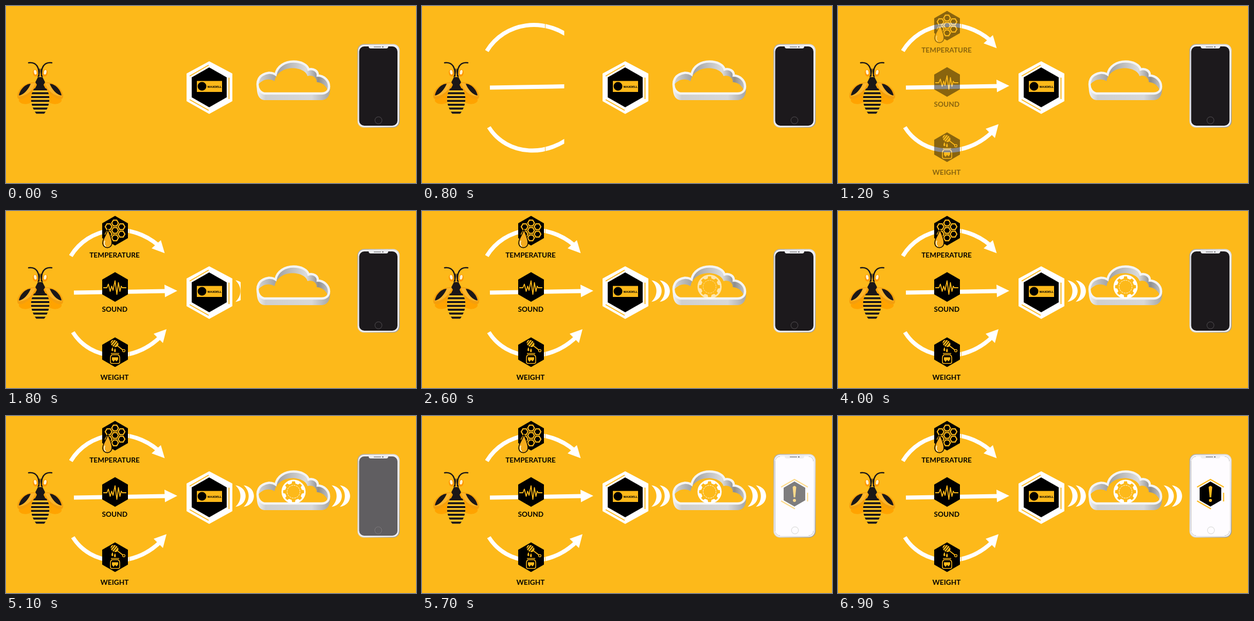
Write an HTML page that moves like this. It is 797x346 px and loops after 8 s.

```html
<!DOCTYPE html>
<html lang="en">
<head>
<meta charset="utf-8">
<title>Hive monitoring</title>
<style>
  html, body { margin: 0; width: 100%; height: 100%; overflow: hidden; background: #fdb91a; }
  svg { display: block; width: 100%; height: 100%; }
  .label { font: bold 13.7px Lato, sans-serif; text-anchor: middle; }
  .brand { font: bold 6.2px Roboto, sans-serif; }
  .line { fill: none; stroke: #fdb91a; }
  .ink { fill: none; stroke: #1b1718; stroke-linecap: round; }
</style>
</head>
<body>
<svg viewBox="0 0 797 346">
  <defs>
    <linearGradient id="wall">
      <stop offset="0" stop-color="#d5d5d5"/><stop offset=".27" stop-color="#a0a0a0"/>
      <stop offset=".68" stop-color="#dcdcdc"/><stop offset=".85" stop-color="#8d8d8d"/>
      <stop offset="1" stop-color="#c5c5c5"/>
    </linearGradient>
    <linearGradient id="side">
      <stop offset="0" stop-color="#f4f4f4"/><stop offset=".12" stop-color="#cfcfcf"/>
      <stop offset=".75" stop-color="#d8d8d8"/><stop offset="1" stop-color="#a5a5a5"/>
    </linearGradient>
    <linearGradient id="steel" x2="1" y2="1">
      <stop offset="0" stop-color="#a9a9ac"/><stop offset=".5" stop-color="#dcdcdf"/>
      <stop offset="1" stop-color="#9a9a9d"/>
    </linearGradient>
    <path id="cloud" d="M502 171C485 167 485 141 500 134C508 129 518 130 524 134C527 117 543 108.500 559 108.500C574 108.500 586 115 588 124C597 121 607 127 606 136C618 136 628 146 628 157C628 166 622 171 613 171Z"/>
    <clipPath id="cloudClip"><use href="#cloud"/></clipPath>
    <path id="abdomen" d="M55 161H78C86 172 88 192 74 211H59C45 192 47 172 55 161Z"/>
    <clipPath id="abdomenClip"><use href="#abdomen"/></clipPath>
    <clipPath id="arrowWipe"><rect id="arrowRect" x="123" y="9" height="321"/></clipPath>
    <clipPath id="waveWipe"><rect id="waveRect" x="445" y="130" height="54"/></clipPath>
    <clipPath id="wave2Wipe"><rect id="wave2Rect" x="632" y="130" height="54"/></clipPath>
    <path id="crescent" d="M446 135.500C472.500 139 472.500 174 446 177.500C459 166 459 147 446 135.500Z"/>
    <g id="waves" fill="#fff"><use href="#crescent"/><use href="#crescent" x="16"/></g>
    <g id="beeHalf">
      <path d="M60 153C42 160 24 176 25 186C31 195 50 193 55 182Z" fill="#ffa300"/>
      <path d="M59 150C44 146 23 159 22 176C22 186 33 183 42 176C50 169 56 160 59 150Z" fill="#f59f0c"/>
      <path d="M57 151C46 149 28 160 24 176C36 178 52 167 57 151Z" fill="#fdb42a"/>
      <path d="M48 152C38 152 27 163 25 175C34 174 44 163 48 152Z" fill="#1b1718"/>
      <path class="ink" stroke-width="2.600" d="M64 137C65 121 60 109 44 111"/>
      <path class="ink" stroke-width="1.500" d="M62 138C65 133 66 128 65 123"/>
      <ellipse cx="57" cy="131" rx="4.800" ry="7" fill="#ff9700" transform="rotate(-12 57 131)"/>
      <ellipse cx="57" cy="129.500" rx="2.600" ry="4.500" fill="#fff3d2" transform="rotate(-12 57 130)"/>
    </g>
  </defs>

  <rect width="797" height="346" fill="#fdb91a"/>

  <g id="bee">
    <use href="#beeHalf"/><use href="#beeHalf" transform="matrix(-1 0 0 1 133 0)"/>
    <path d="M62 139H71L76 149L73 154L77 162H56L60 154L57 149Z" fill="#1b1718"/>
    <use href="#abdomen" fill="#ffc52b"/>
    <path clip-path="url(#abdomenClip)" d="M45 163H88M45 170.500H88M45 178H88M45 185.500H88M45 193H88M45 200.500H88M45 208.500H88" class="ink" stroke-width="4.200"/>
  </g>

  <g id="device">
    <path d="M395 108L440 132V186L395 211L351 186V132Z" fill="#fff"/>
    <path class="line" stroke-width="2" d="M357 137L394 115.500M433.500 140V182M357 183L394 204"/>
    <path data-hex="395 159 34 39"/>
    <rect x="371" y="146.500" width="49" height="21.500" fill="#fdb91a"/>
    <circle cx="381" cy="157" r="8.500"/>
    <text class="brand" x="391.500" y="159.500">WAXDELL</text>
  </g>

  <g clip-path="url(#arrowWipe)">
    <g fill="none" stroke="#fff" stroke-width="8">
      <path d="M126 88C160 32 238 18 296 67"/>
      <path d="M132 159.500L312 156.500"/>
      <path d="M130 237C165 293 246 299 300 246"/>
    </g>
    <path fill="#fff" d="M283 73L301 57L308.500 82.500ZM308 144L333 156L309 168.500ZM287 240L312 231L305 258Z"/>
    <path class="line" d="M239.500 32V48M239.500 272V288"/>
  </g>

  <g id="sensors">
    <path data-hex="212 38.500 25 29"/>
    <path data-hex="212 148.500 25 29"/>
    <path data-hex="212 276 25 29"/>
    <path id="comb" class="line" stroke-width="2.200"/>
    <path d="M198 36C202 47 206 54 206 62C206 75 188 75 188 62C188 54 195 47 198 36Z" fill="#f5ab1c" stroke="#000" stroke-width="1.500"/>
    <path d="M192 58C190 65 192 68 194 69" fill="none" stroke="#fff" stroke-width="1.500"/>
    <path class="line" stroke-width="1.800" stroke-linejoin="round" d="M189 150H196L199 143L202.500 157L205.500 147L208 155L212 136.500L215.500 163L218.500 140L221.500 157L224 147L226 150H234"/>
    <g transform="rotate(38 211 259)">
      <ellipse cx="211" cy="259" rx="8" ry="6.500" fill="#fdb91a"/>
      <path d="M206 252V266M210 252V266M214 252V266" stroke="#000" stroke-width="1.200"/>
      <path class="line" stroke-width="1.800" d="M219 259H232"/>
    </g>
    <circle cx="229" cy="273" r="2.400" class="line" stroke-width="1.400"/>
    <path fill="#fdb91a" d="M207 266Q203 273 207 274Q210 273 207 266ZM212 268Q208 275 212 276Q215 275 212 268Z"/>
    <path class="line" stroke-width="1.600" d="M204 278.500H220M206 281Q203 283 203 287V295Q203 298 206 298H218Q221 298 221 295V287Q221 283 218 281Z"/>
    <path fill="#fdb91a" d="M206 286H218V290L215 294L212 291L209 295L206 291Z"/>
    <text class="label" x="211" y="90.700">TEMPERATURE</text>
    <text class="label" x="211.300" y="196.700">SOUND</text>
    <text class="label" x="211" y="329.500">WEIGHT</text>
  </g>

  <use href="#waves" clip-path="url(#waveWipe)"/>
  <g clip-path="url(#wave2Wipe)"><use href="#waves" x="187"/></g>

  <g id="cloudBody">
    <path d="M487.500 154C487 174 492 184 505 184H612C624 184 631 176 630 157L613 171H503Z" fill="url(#side)"/>
    <use href="#cloud" fill="url(#wall)"/>
    <g clip-path="url(#cloudClip)"><use href="#cloud" x="-2" y="13" fill="#fdb91a"/></g>
    <use href="#cloud" fill="none" stroke="#f4f4f4" stroke-width="4.500"/>
  </g>

  <g id="disc">
    <circle cx="559" cy="148" r="23.500" fill="#fff"/>
    <g id="gear">
      <path id="gearBody" fill="#fdb91a"/>
      <circle cx="559" cy="148" r="12.500" fill="none" stroke="#fff" stroke-width=".9" stroke-dasharray="3.400 1.500"/>
    </g>
  </g>

  <g id="phone">
    <rect x="684" y="75" width="80.500" height="162" rx="12" fill="#f0f0f2" stroke="url(#steel)" stroke-width="1.600"/>
    <rect x="686.500" y="79" width="74.500" height="155" rx="10" fill="#1c191c"/>
    <circle cx="724" cy="223.500" r="6.800" fill="none" stroke="#454245" stroke-width="1.200"/>
    <g id="lit">
      <rect x="686.500" y="79" width="74.500" height="155" rx="10" fill="#fefcff"/>
      <circle cx="725" cy="223.500" r="6.800" fill="none" stroke="#ddd" stroke-width="1.200"/>
    </g>
    <path d="M705 76H743V79Q743 83 739 83H709Q705 83 705 79Z" fill="#ededf0"/>
    <path d="M715 80H729" stroke="#77777b" stroke-width="1.300"/>
    <circle cx="732.500" cy="80" r="1.200" fill="#55555a"/>
  </g>

  <g id="alert">
    <path class="line" stroke-width="2.200" d="M698 139L724 124L750 139M749.500 150V167M698 166L725 181.500"/>
    <path data-hex="724 152.500 21 24.500"/>
    <path fill="#fdb91a" d="M720.500 139Q724 134 727.500 139L725.500 159H722.500Z"/>
    <circle cx="724" cy="165" r="3" fill="#fdb91a"/>
  </g>
</svg>
<script>
const $ = id => document.getElementById(id);
const LOOP = 8000, STEP = 100;

// Six corners, the first one at the given angle in degrees.
function hexagon(cx, cy, rx, ry, start) {
  const points = [];
  for (let i = 0; i < 6; i++) {
    const a = (start + i * 60) * Math.PI / 180;
    points.push((cx + rx * Math.cos(a)).toFixed(2) + ' ' + (cy + ry * Math.sin(a)).toFixed(2));
  }
  return 'M' + points.join('L') + 'Z';
}

for (const path of document.querySelectorAll('[data-hex]')) {
  const [cx, cy, halfWidth, halfHeight] = path.dataset.hex.split(' ').map(Number);
  path.setAttribute('d', hexagon(cx, cy, halfWidth / Math.cos(Math.PI / 6), halfHeight, 30));
}

let comb = hexagon(212, 38, 6.5, 6.5, 0);
for (let i = 0; i < 6; i++) {
  const a = (30 + i * 60) * Math.PI / 180;
  comb += hexagon(212 + 14.5 * Math.cos(a), 38 + 14.5 * Math.sin(a), 6.5, 6.5, 0);
}
$('comb').setAttribute('d', comb);

const teeth = [];
for (let i = 0; i < 8; i++) {
  for (const [offset, r] of [[-13, 16.5], [-8, 20.5], [8, 20.5], [13, 16.5]]) {
    const a = (i * 45 + offset) * Math.PI / 180;
    teeth.push((559 + r * Math.cos(a)).toFixed(2) + ' ' + (148 + r * Math.sin(a)).toFixed(2));
  }
}
$('gearBody').setAttribute('d', 'M' + teeth.join('L') + 'Z');

const ramp = (t, from, to) => Math.min(1, Math.max(0, (t - from) / (to - from)));
const fade = (id, amount) => $(id).setAttribute('opacity', amount);
const wipe = (id, width, amount) => $(id).setAttribute('width', width * amount);

function draw(t) {
  wipe('arrowRect', 211, ramp(t, 400, 950));
  fade('sensors', ramp(t, 950, 1500));
  wipe('waveRect', 39, ramp(t, 1600, 2300));
  fade('disc', ramp(t, 2250, 2800));
  $('gear').setAttribute('transform', `rotate(${360 * ramp(t, 2800, 4400)} 559 148)`);
  wipe('wave2Rect', 39, ramp(t, 4300, 4800));
  fade('lit', ramp(t, 4950, 5450));
  fade('alert', ramp(t, 5450, 5950));
}

const begin = performance.now();
function tick() {
  const t = (performance.now() - begin) % LOOP;
  draw(Math.floor(t / STEP) * STEP);
  requestAnimationFrame(tick);
}
tick();
</script>
</body>
</html>
```
